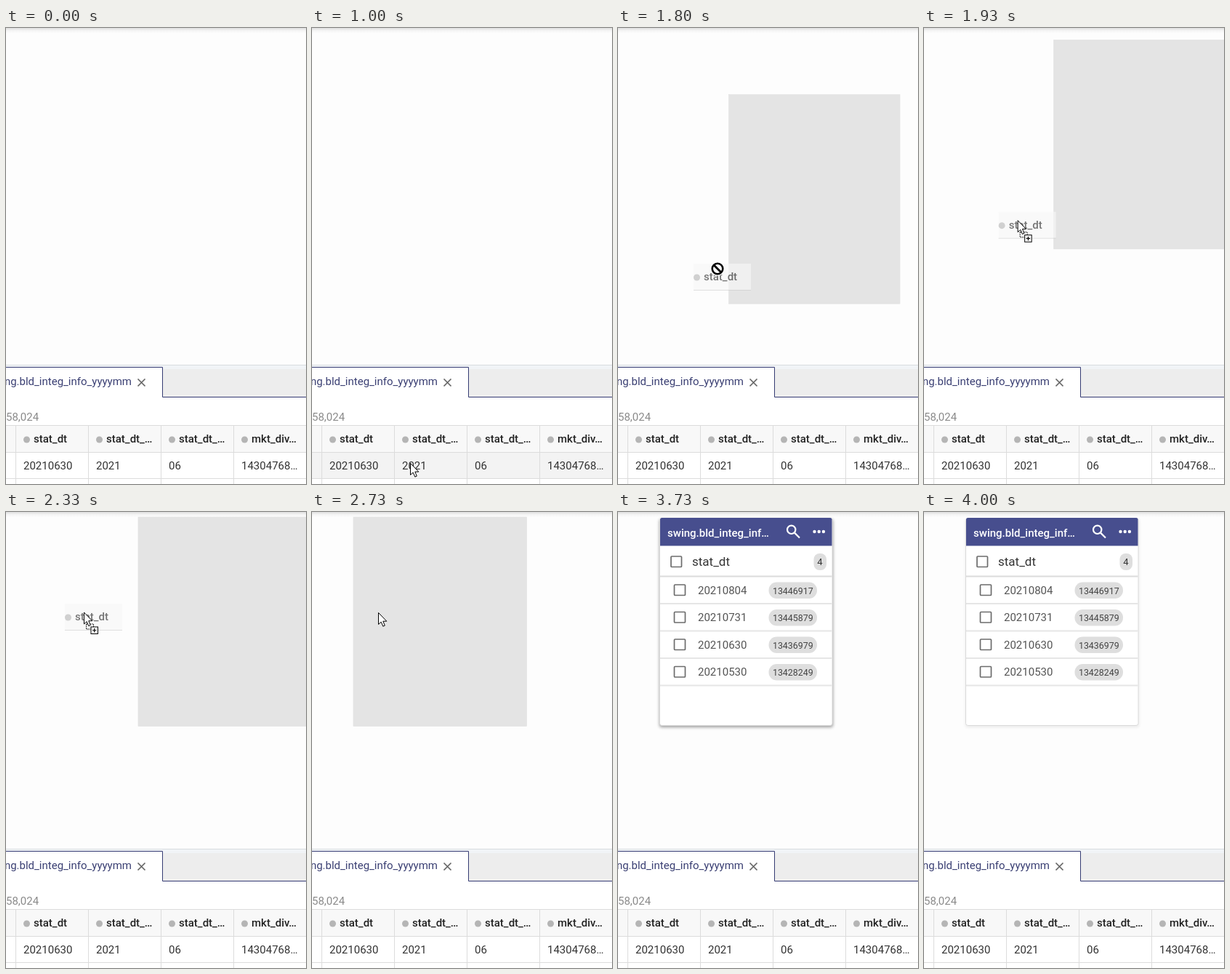
These frames come from a looping animation (413 by 627 pixels, 4.94 s). An HTML page:

```html
<!DOCTYPE html>
<html lang="en">
<head>
<meta charset="utf-8">
<title>Drag a column onto the board</title>
<style>
  html, body { margin: 0; width: 100%; height: 100%; overflow: hidden; background: #fdfdfd; }
  svg { display: block; width: 413px; height: 627px; font: 15px Roboto, Arial, sans-serif; }
  .head { font-weight: 500; fill: #222; }
  .box { fill: none; stroke: #6c6c6c; stroke-width: 1.7; }
</style>
</head>
<body>
<svg viewBox="0 0 413 627" xmlns="http://www.w3.org/2000/svg">
  <defs>
    <linearGradient id="topShade" x2="0" y2="1">
      <stop offset="0" stop-color="#dfdfdf"/>
      <stop offset=".5" stop-color="#f4f4f4"/>
      <stop offset="1" stop-color="#fdfdfd"/>
    </linearGradient>
    <filter id="blur" x="-10%" y="-10%" width="120%" height="120%"><feGaussianBlur stdDeviation="2.2"/></filter>
    <clipPath id="board"><rect width="413" height="463"/></clipPath>
  </defs>

  <rect width="413" height="627" fill="#fdfdfd"/>
  <rect width="413" height="7" fill="url(#topShade)"/>

  <g clip-path="url(#board)">
    <rect id="slot" fill="#e4e4e4" stroke="#dfdfdf" stroke-width=".6"/>
  </g>

  <g id="card">
    <rect id="shadow" x="57" y="10" width="239" height="286" rx="3" fill="#000" filter="url(#blur)"/>
    <rect x="57.5" y="8.5" width="237.5" height="285" rx="3" fill="#fff" stroke="#dadada"/>
    <path d="M58 46.5V10.5a2.5 2.5 0 0 1 2.5-2.5h231.500a2.500 2.500 0 0 1 2.500 2.500v36z" fill="#474e8e"/>
    <text x="68" y="34" font-weight="500" fill="#fff">swing.bld_integ_inf…</text>
    <g fill="none" stroke="#fff" stroke-width="2.2">
      <circle cx="238.700" cy="24.300" r="5.700"/>
      <path d="M242.800 28.400L250 35.500"/>
    </g>
    <g fill="#fff">
      <circle cx="270.500" cy="27" r="2.200"/><circle cx="276.700" cy="27" r="2.200"/><circle cx="282.900" cy="27" r="2.200"/>
    </g>
    <rect class="box" x="73" y="61" width="14.500" height="14.500" rx="1"/>
    <text x="102" y="74" font-size="17" fill="#333">stat_dt</text>
    <path d="M58 88.500H294.500" stroke="#dcdcdc" stroke-width="2"/>
    <rect id="pill" y="57" height="23" fill="#dedede"/>
    <g id="data"></g>
    <g id="busy">
      <rect x="58" y="47" width="236.500" height="246" fill="#c1c1c1" opacity=".5"/>
      <path id="arc" fill="none" stroke="#434a80" stroke-width="4.600"/>
    </g>
  </g>

  <g id="panel"></g>

  <g id="ghost" opacity=".62">
    <rect x="24" y="547" width="79" height="36" fill="#f8f8f8"/>
    <path d="M24 583.500H103" stroke="#ccc"/>
    <circle cx="28.500" cy="566" r="4.500" fill="#b5b5b5"/>
    <text class="head" x="38" y="570">stat_dt</text>
  </g>

  <g id="deny">
    <circle r="7.300" fill="#fff" stroke="#fff" stroke-width="5"/>
    <path d="M-5 -5L5 5" stroke="#000" stroke-width="2.800"/>
    <circle r="7.300" fill="none" stroke="#000" stroke-width="2.600"/>
  </g>
  <g id="arrow">
    <g id="copy">
      <rect x="3.500" y="16.500" width="10" height="7" fill="none" stroke="#000" stroke-dasharray="1.500 1"/>
      <rect x="10" y="20.500" width="9.500" height="9.500" fill="#fff" stroke="#000"/>
      <path d="M12 25.250h5.500M14.750 22.500v5.500" stroke="#000" stroke-width="1.200"/>
    </g>
    <path d="M.5 .5V16.500L4.200 13.200L6.800 19.200L9.300 18.100L6.800 12.200H11.800Z" fill="#fff" stroke="#000"/>
  </g>
</svg>

<script>
const LOOP = 4940, STEP = 1000 / 15;
const $ = id => document.getElementById(id);
const set = (id, attrs) => { for (const k in attrs) $(id).setAttribute(k, attrs[k]); };
const show = (id, on) => set(id, { visibility: on ? 'visible' : 'hidden' });
const place = (id, [x, y]) => set(id, { transform: `translate(${x} ${y})` });
const clamp = v => Math.max(0, Math.min(1, v));
const ramp = (t, a, b) => clamp((t - a) / (b - a));
const smooth = p => p * p * (3 - 2 * p);

// Linear path through [time, x, y] points
function along(points, t) {
  let a = points[0];
  for (const b of points) {
    if (t <= b[0]) {
      const p = b === a ? 0 : ramp(t, a[0], b[0]);
      return [a[1] + (b[1] - a[1]) * p, a[2] + (b[2] - a[2]) * p];
    }
    a = b;
  }
  return [a[1], a[2]];
}

function buildPanel() {
  const titles = ['stat_dt', 'stat_dt_…', 'stat_dt_…', 'mkt_div…'];
  const values = ['20210630', '2021', '06', '14304768…'];
  let s = `<rect y="463" width="413" height="164" fill="#fff"/>
    <rect y="463" width="413" height="6" fill="#f1f4f7"/>
    <path d="M0 463.5H413" stroke="#d8dce0"/>
    <rect x="216" y="469" width="197" height="38" fill="#ededed"/>
    <rect y="467" width="215" height="41" fill="#fff"/>
    <path d="M0 466.5H215.5V507.5H413" fill="none" stroke="#353b73"/>
    <text x="173" y="491" text-anchor="end" fill="#3a3f73">swing.bld_integ_info_yyyymm</text>
    <path d="M181.500 482.500l10 10m0 -10l-10 10" stroke="#666" stroke-width="1.700"/>
    <text x="0" y="540" fill="#8a8a8a">58,024</text>
    <rect y="546" width="413" height="37" fill="#f8f8f8"/>
    <rect id="hover" y="584" width="413" height="35" fill="#f3f3f3"/>
    <path d="M0 546.500H413M0 583.500H413M0 619.500H413" stroke="#dcdcdc"/>`;
  titles.forEach((title, i) => {
    const x = 100 * i;
    s += `<path d="M${x + 13.5} 546V627" stroke="#dcdcdc"/>
      <circle cx="${x + 28.5}" cy="566" r="4.500" fill="#b5b5b5"/>
      <text class="head" x="${x + 38}" y="570">${title}</text>
      <text x="${x + 24}" y="607" fill="#333">${values[i]}</text>`;
  });
  $('panel').innerHTML = s;
}

function buildData() {
  const rows = [['20210804', '13446917'], ['20210731', '13445879'], ['20210630', '13436979'], ['20210530', '13428249']];
  $('data').innerHTML = '<text x="278" y="73" font-size="13" text-anchor="middle" fill="#333">4</text>' +
    rows.map(([day, count], i) => `<g transform="translate(0 ${37.5 * i})">
      <rect class="box" x="77.500" y="100" width="15" height="14.500" rx="1"/>
      <text x="110" y="112.500" fill="#555">${day}</text>
      <rect x="207.500" y="96.500" width="66.500" height="22.500" rx="11" fill="#dedede"/>
      <text x="240.800" y="112.500" font-size="12.400" text-anchor="middle" fill="#444">${count}</text>
      <path d="M58 126H294.500" stroke="#e6e6e6" stroke-width="2"/>
    </g>`).join('');
}

// Times of the main events
const HOVER = 533, ENTER = 733, GRAB = 1466, PREVIEW = 1733, ALLOW = 1930,
  SHIFT = 2333, DROP = 2733, CARD = 2800, LOADED = 3530, GONE = 3730;

const approach = [[ENTER, 162, 618], [1000, 135, 598], [1200, 64, 576], [1270, 58, 562], [1340, 57, 556], [GRAB, 84, 536]];
const drag = [[GRAB, 32, -25], [1600, 50, -90], [PREVIEW, 71, -165], [1800, 80, -223],
  [2000, 78, -330], [2200, 64, -408], [SHIFT, 57, -421], [2533, 41, -421]];
const leave = [[3130, 91, 138], [3266, 91, 140], [3400, 91, 140], [3533, 178, 205], [3666, 341, 309]];

function drawSlot(t) {
  show('slot', t >= PREVIEW - 1 && t < CARD + 132);
  const p = t < 1800 ? .77 * ramp(t, PREVIEW, 1800) : 1 - .23 * (1 - ramp(t, 1800, 2000)) ** 2;
  const q = smooth(ramp(t, SHIFT, 2533));
  set('slot', {
    x: 54 + 128 * p - 125 * q,
    y: 375 - 368 * p,
    width: 235.5 + 3 * ramp(t, 1800, 2000),
    height: 287.5
  });
}

function drawPointer(t) {
  const dragging = t >= GRAB && t < DROP - 1;
  const denied = dragging && t < ALLOW;
  const [gx, gy] = along(drag, t);
  show('ghost', dragging);
  place('ghost', [gx, gy]);
  show('deny', denied);
  place('deny', [gx + 57, gy + 554]);
  show('arrow', t >= ENTER - 1 && t < GONE && !denied);
  show('copy', dragging && !denied);
  place('arrow', dragging ? [gx + 50, gy + 558.5] : t < GRAB ? along(approach, t) : along(leave, t));
}

function drawSpinner(t) {
  const half = 500, mid = 3045;
  const growing = t >= mid;
  const p = smooth(ramp(t, growing ? mid : mid - half, growing ? mid + half : mid));
  const sweep = 18 + 270 * (growing ? p : 1 - p);
  const turn = 104 + .18 * (t - mid);
  const tail = growing ? turn : turn + 18 - sweep;
  const at = deg => {
    const a = deg * Math.PI / 180;
    return `${175.5 + 22.8 * Math.cos(a)} ${170 + 22.8 * Math.sin(a)}`;
  };
  set('arc', { d: `M${at(tail)}A22.8 22.8 0 ${sweep > 180 ? 1 : 0} 1 ${at(tail + sweep)}` });
}

function drawCard(t) {
  const loaded = t >= LOADED;
  set('card', { opacity: ramp(t, CARD - STEP, CARD + 2 * STEP) });
  set('shadow', { opacity: .08 + .3 * ramp(t, 2933, 3266) * (1 - ramp(t, GONE, 4000)) });
  set('data', { opacity: loaded ? 1 : 0 });
  set('pill', loaded ? { x: 269.5, width: 17.5, rx: 8 } : { x: 277, width: 10, rx: 5 });
  set('busy', { opacity: 1 - ramp(t, LOADED - STEP, LOADED + STEP) });
  drawSpinner(t);
}

function draw(ms) {
  const t = Math.floor((ms % LOOP + 4) / STEP) * STEP;
  show('hover', t >= HOVER && t < 1130);
  drawSlot(t);
  drawPointer(t);
  drawCard(t);
}

buildPanel();
buildData();
const start = performance.now();
function tick() {
  draw(performance.now() - start);
  requestAnimationFrame(tick);
}
tick();
</script>
</body>
</html>
```
